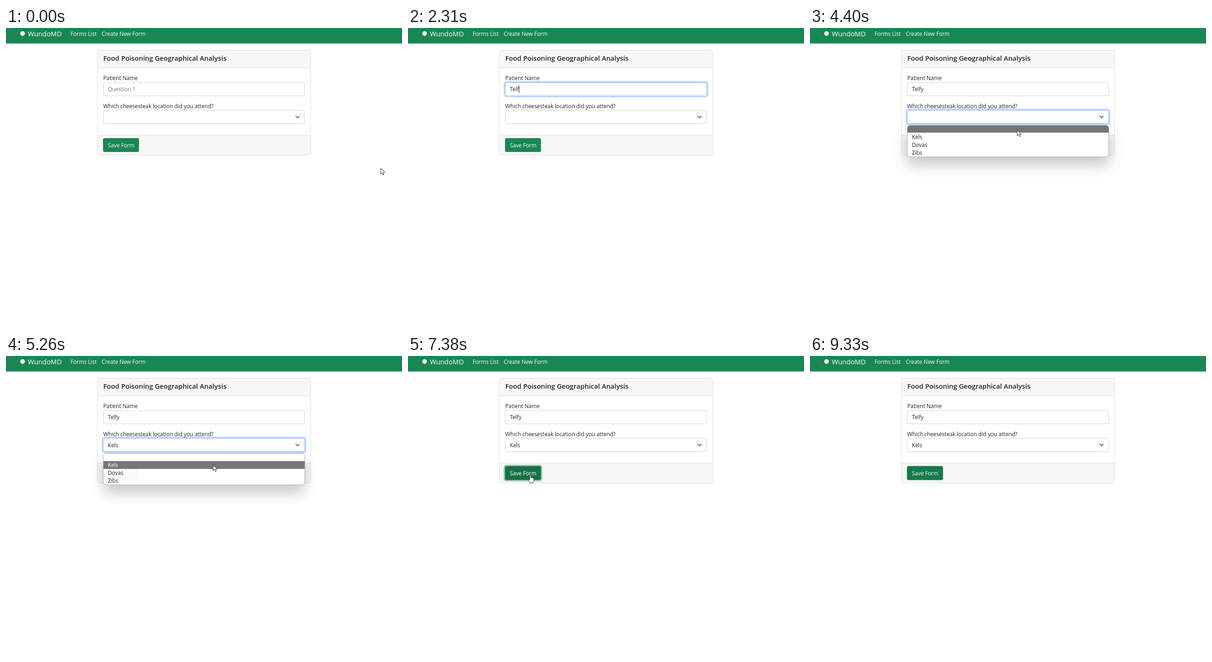
These frames come from a looping animation (861x651 px, 9.38 s). An HTML page:

```html
<!DOCTYPE html>
<html lang="en">
<head>
<meta charset="utf-8">
<title>Form demo</title>
<style>
  html, body { margin: 0; width: 100%; height: 100%; overflow: hidden; background: #fff; }
  svg { display: block; width: 861px; height: 651px; }
  text { font: 11.8px "Open Sans", "Noto Sans", sans-serif; fill: #212529; white-space: pre; }
  .light { fill: #fff; }
  .brand { font-size: 14.75px; }
  .title { font-size: 14.75px; font-weight: 600; }
  .hint { fill: #6c8085; }
  .line { fill: none; stroke: #dfdfdf; }
  .field { fill: #fff; stroke: #ced4da; }
  .ring { fill: none; }
  #popup { filter: drop-shadow(0 17px 15px rgba(0, 0, 0, .22)); }
  .pointer { fill: #fff; stroke: #1c1c1c; stroke-width: .9; stroke-linejoin: round; }
</style>
</head>
<body>
<svg viewBox="0 0 861 651">
  <rect width="861" height="33.6" fill="#198754"/>
  <circle cx="36" cy="12" r="5" fill="#fff"/>
  <text class="light brand" x="47.5" y="18">WundoMD</text>
  <text class="light" x="140.5" y="16.5">Forms List</text>
  <text class="light" x="208" y="16.5">Create New Form</text>

  <path d="M199 86V51q0-2 2-2H661q2 0 2 2V86zM199 233H663V273q0 2-2 2H201q-2 0-2-2z" fill="#f7f7f7"/>
  <rect class="line" x="198.5" y="48.5" width="464" height="227" rx="3"/>
  <path class="line" d="M199 86.5H662M199 232.5H662"/>
  <text class="title" x="211.5" y="70.5">Food Poisoning Geographical Analysis</text>

  <text x="211.5" y="113">Patient Name</text>
  <rect class="ring" id="nameRing"/>
  <rect class="field" id="nameBox" x="211.5" y="118.5" width="438" height="28.6" rx="3"/>
  <text class="hint" id="hint" x="221.5" y="137">Question 1</text>
  <text id="name" x="221.5" y="137"></text>
  <rect id="caret" y="125" width="1" height="16" fill="#111"/>

  <text x="211.5" y="173.5">Which cheesesteak location did you attend?</text>
  <rect class="ring" id="pickRing"/>
  <rect class="field" id="pickBox" x="211.5" y="178.5" width="438" height="29" rx="3"/>
  <text id="choice" x="221.5" y="198">Kels</text>
  <path d="M630.2 191.2l3.7 3.7 3.7-3.7" fill="none" stroke="#343a40" stroke-width="1.4" stroke-linecap="round" stroke-linejoin="round"/>

  <rect class="ring" id="saveRing"/>
  <rect id="saveBox" x="211" y="239" width="78" height="30" rx="3"/>
  <text class="light" x="221.5" y="259">Save Form</text>

  <g id="popup">
    <rect x="211.5" y="211.5" width="438" height="68" rx="6" fill="#fff" stroke="#b0b0b0"/>
    <path id="rowTop" d="M212 227V217.5q0-6 6-6H643.5q6 0 6 6V227z" fill="#757575"/>
    <rect id="rowPick" x="212" y="228" width="437.5" height="17" fill="#757575"/>
    <text id="optPick" x="221.5" y="240.5">Kels</text>
    <text x="221.5" y="257.5">Dovas</text>
    <text x="221.5" y="274.5">Zibs</text>
  </g>

  <g id="cursor">
    <path class="pointer" id="arrow" d="M.4.4V13L3.3 10.4 5.2 14.8 7.2 14 5.3 9.6H9.3z"/>
    <path id="beam" d="M-3-6.5H-1L0-5.7 1-6.5H3M0-5.7V5.7M-3 6.5H-1L0 5.7 1 6.5H3" fill="none" stroke="#222" stroke-width="1.1"/>
    <path class="pointer" id="hand" d="M-1.2 1.2Q0-.4 1.2 1.2V6Q2.8 5 3.5 6.4 5 5.6 5.6 7 7.6 6.6 7.7 8.6V12Q7.5 14.5 6.2 16V17.6H-.6V16.2L-4.6 11.4Q-5.2 9.4-3 9.8L-1.2 11.4z"/>
  </g>
</svg>
<script>
const LOOP = 9380;
const $ = id => document.getElementById(id);
const show = (id, on) => $(id).setAttribute('display', on ? 'inline' : 'none');
const attrs = (el, map) => { for (const k in map) el.setAttribute(k, map[k]); };

// Pointer moves: first step, last step, step count, end x, end y
const moves = [
  [70, 150, 2, 789, 299],
  [460, 992, 8, 594, 140],
  [2920, 3090, 3, 513, 120],
  [3240, 3400, 3, 484, 198],
  [4090, 4160, 2, 477, 211],
  [4330, 4400, 2, 450, 221],
  [4480, 4630, 3, 450, 236],
  [5650, 5730, 2, 418, 288],
  [5810, 5810, 1, 450, 311],
  [6190, 6580, 6, 266, 258],
  [7450, 7760, 5, 740, 371],
  [8310, 8690, 6, 839, 621]
];
const NAME = 'Telfy';
const keys = [1850, 2000, 2080, 2310, 2390];

function pointer(t) {
  let x = 814.5, y = 304;
  for (const [from, to, n, ex, ey] of moves) {
    if (t < from) break;
    const step = n > 1 ? (to - from) / (n - 1) : 1;
    const p = Math.min(n, Math.floor((t - from) / step + 1e-6) + 1) / n;
    x += (ex - x) * p;
    y += (ey - y) * p;
  }
  return [x, y];
}

function fade(t, start, length) {
  const p = Math.max(0, Math.min(1, (t - start) / length));
  return 1 - (1 - p) ** 2;
}
const pulse = (t, on, rise, off, fall) => fade(t, on, rise) - fade(t, off, fall);
const between = (t, a, b) => t >= a && t < b;
const mix = (a, b, p) => `rgb(${a.map((v, i) => Math.round(v + (b[i] - v) * p))})`;

// Focus ring grows outward from the outer edge of a box
function ring(id, box, edge, rgb, peak, p) {
  const grow = edge + 1.5 * p;
  const num = k => +$(box).getAttribute(k);
  attrs($(id), {
    x: num('x') - grow, y: num('y') - grow,
    width: num('width') + 2 * grow, height: num('height') + 2 * grow,
    rx: 3 + grow, stroke: `rgba(${rgb},${peak * p})`, 'stroke-width': 3 * p
  });
}

function focusField(id, box, p) {
  ring(id, box, .5, '13,110,253', .25, p);
  $(box).style.stroke = mix([206, 212, 218], [134, 183, 254], p);
}

function draw(t) {
  focusField('nameRing', 'nameBox', pulse(t, 1068, 150, 3630, 150));
  focusField('pickRing', 'pickBox', pulse(t, 3630, 150, 6030, 75));

  const typed = keys.filter(k => t >= k).length;
  $('name').textContent = NAME.slice(0, typed);
  show('hint', !typed);
  const width = typed ? $('name').getComputedTextLength() : 0;
  $('caret').setAttribute('x', Math.round(221.5 + width));
  show('caret', between(t, 1068, 1620) || between(t, 1850, 2920) || between(t, 3400, 3630));

  const [x, y] = pointer(t);
  const onPick = y >= 227.5;
  $('popup').setAttribute('opacity', pulse(t, 3600, 150, 5260, 70));
  show('popup', between(t, 3630, 5330));
  show('rowTop', !onPick);
  show('rowPick', onPick);
  $('optPick').style.fill = onPick ? '#fff' : '#212529';
  show('choice', t >= 5260);

  ring('saveRing', 'saveBox', 0, '60,153,110', .5, pulse(t, 7150, 150, 9230, 320));
  const dark = pulse(t, 6500, 150, 9230, 500);
  $('saveBox').style.fill = mix([25, 135, 84], [21, 115, 71], dark);

  const overName = x > 211 && x < 650 && y > 118 && y < 147;
  const overSave = x > 211 && x < 289 && y > 239 && y < 269;
  show('beam', overName);
  show('hand', overSave);
  show('arrow', !overName && !overSave);
  show('cursor', !between(t, 1390, 2920) && t < 8770);
  $('cursor').setAttribute('transform', `translate(${x} ${y})`);
}

const start = performance.now();
function tick() {
  draw((performance.now() - start) % LOOP);
  requestAnimationFrame(tick);
}
tick();
</script>
</body>
</html>
```
